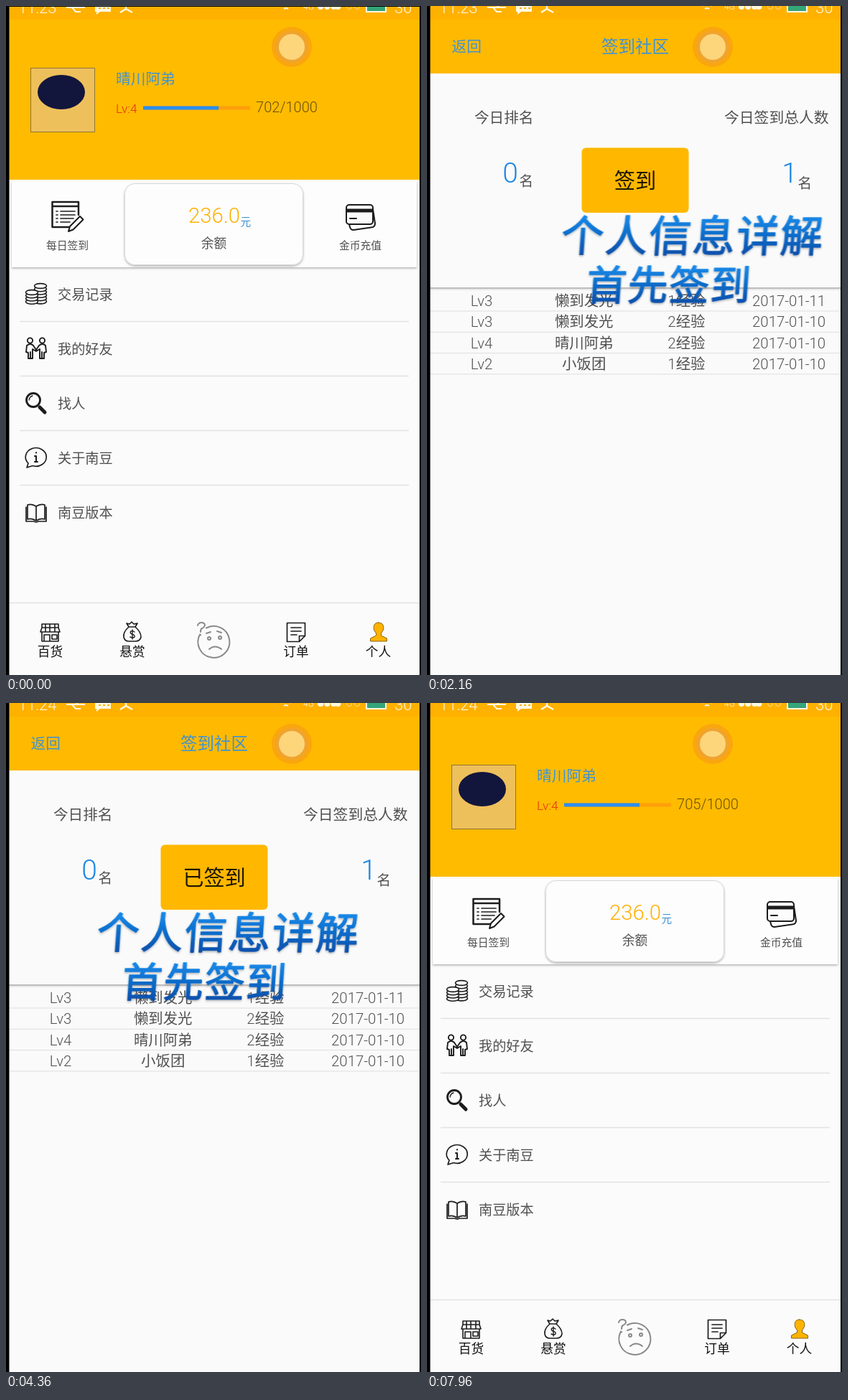
Recreate the animation shown at these times as an HTML page. Size 578 by 932 pixels, loop 8000 ms.

```html
<!DOCTYPE html>
<html lang="zh-CN">
<head>
<meta charset="utf-8">
<title>签到</title>
<style>
  html, body { margin: 0; width: 100%; height: 100%; overflow: hidden; background: #000; }
  svg { display: block; width: 578px; height: 932px; }
  text { font-family: Roboto, "Noto Sans CJK SC", "Noto Sans CJK", sans-serif; font-weight: 300; white-space: pre; }
  .brush text { font-weight: 400; stroke: url(#ink); stroke-width: 1.4; stroke-linejoin: round; }
  .nav text { font-weight: 400; }
  .icon { fill: none; stroke: #1c1c1c; stroke-width: 2; stroke-linecap: round; stroke-linejoin: round; }
  .icon.pale { stroke: #8a8a8a; }
  .icon .paper { fill: #fcfcfc; }
</style>
</head>
<body>
<svg viewBox="0 0 578 932">
  <defs>
    <linearGradient id="ink" x1="0" y1="0" x2="0" y2="1">
      <stop offset=".1" stop-color="#1488e8"/>
      <stop offset=".9" stop-color="#0b4da8"/>
    </linearGradient>
    <filter id="shade" x="-10%" y="-10%" width="120%" height="130%">
      <feDropShadow dx="0" dy="1.5" stdDeviation="1.5" flood-color="#000" flood-opacity=".3"/>
    </filter>
  </defs>

  <g id="home">
    <rect x="4" width="572" height="932" fill="#fbfbfb"/>
    <rect x="4" width="572" height="242" fill="#ffbb00"/>
    <rect x="34.5" y="86.5" width="89" height="89" fill="#eec05c" stroke="#8f7434"/>
    <ellipse cx="77" cy="120" rx="33" ry="24" fill="#12163c"/>
    <path d="M191 142h149" stroke="#ff9f0a" stroke-width="5"/>
    <path d="M191 142h105" stroke="#2b8eee" stroke-width="5"/>
    <rect x="8" y="244" width="564" height="120" fill="#fdfdfd" filter="url(#shade)"/>
    <rect x="165.500" y="247.500" width="248" height="113" rx="14" fill="#fdfdfd" stroke="#d8d8d8" filter="url(#shade)"/>
    <path d="M19 439.500h542m-542 76h542m-542 76h542m-542 76h542M4 831.500h572" stroke="#e2e2e2" stroke-width="1.500"/>

    <g class="icon">
      <!-- daily sign-in -->
      <path d="M101 291v-18H64.500v35H89M64.500 279H101" stroke-width="2.500"/>
      <path d="M70 286h2m4 0h20M70 291h2m4 0h20M70 296h2m4 0h18M70 301h2m4 0h13" stroke-width="1.700"/>
      <path class="paper" d="M87 314l2-7 14-14 4.500 4.500-14 14z"/>
      <!-- cards -->
      <path d="M511 283l3 20q0 4-3 5l-27 4q-4 0-5-4l-1-4"/>
      <rect class="paper" x="474" y="277" width="37" height="27" rx="4"/>
      <path d="M475 285h35" stroke-width="5" stroke-linecap="butt"/>
      <path d="M479 296h9"/>
      <!-- coins -->
      <g id="coins" stroke-width="1.600"></g>
      <!-- friends -->
      <g stroke-width="1.900">
        <circle cx="33.500" cy="466" r="3.600"/>
        <circle cx="50.500" cy="466" r="3.600"/>
        <path d="M29 473q5-4 9 0l4 6 4-6q5-4 9 0l1 9-3 1v8h-6v-13l-5 3-5-3v13h-6v-8l-3-1z"/>
        <path d="M34 482v8m16-8v8"/>
      </g>
      <!-- search -->
      <circle cx="38" cy="549" r="9.500" stroke-width="2.800"/>
      <path d="M47 559l7 7" stroke-width="5"/>
      <path d="M32 549q1-5 5-6" stroke-width="1.300"/>
      <!-- about -->
      <path d="M31 637l-2 6 8-2.500a14.500 12.800 0 1 0-6-3.500z" stroke-width="1.700"/>
      <path d="M40 627h2v8m-2 0h4M42 622v.500"/>
      <!-- book -->
      <path d="M42 697q-6-4-12-2v20q6-2 12 2 6-4 12-2v-20q-6-2-12 2v20M28 698v20h11q3 2 6 0h11v-20" stroke-width="1.700"/>
      <!-- store -->
      <path d="M50 861h23v5H50zM50 866l-2 6h27l-2-6M55 861v11m6-11v11m7-11v11M50 872v13h23v-13M53 885v-9h8v9m3-3v-6h7v6z" stroke-width="1.600"/>
      <!-- money bag -->
      <path d="M171 865q-8 7-7 14 1 6 7 6h9q7 0 8-6 0-7-8-14zM171 865l-3-5 4 1 3-3 3 3 5-1-3 5" stroke-width="1.600"/>
      <path d="M179 872q-3-2-5-1-2 2 1 4 5 1 4 4-2 2-6 0M176 869v13" stroke-width="1.400"/>
      <!-- order -->
      <path d="M391.500 859.500h25v18l-8 8h-17zM416.500 877.500h-8v8M397 866h14m-14 5h14m-14 5h8" stroke-width="1.700"/>
      <!-- person -->
      <path d="M518.500 859c-6 0-7 5-6 10l3 5v3l-8 4v4h23v-4l-8-4v-3l3-5c1-5 0-10-7-10z" fill="#ffb300" stroke="#8a6510" stroke-width="1"/>
    </g>
    <g class="icon pale">
      <path d="M279 866.500a22 22 0 1 1-9 9"/>
      <path d="M267 863q1-4 5-4 5 0 5 4-1 3-4 4-2 1-2 5m0 4v.500"/>
      <circle cx="283" cy="881" r="2"/>
      <circle cx="298" cy="880" r="2"/>
      <path d="M279 874l6-2m9-1l6 2M283 896q8-7 17 0"/>
    </g>
  </g>

  <g id="sign">
    <rect x="4" width="572" height="932" fill="#fafafa"/>
    <rect x="4" width="572" height="94" fill="#ffb900"/>
    <path d="M4 393h572" stroke="#bdbdbd" stroke-width="2"/>
    <path d="M4 395h572" stroke="#e9e9e9" stroke-width="2"/>
    <rect id="button" x="215.500" y="197.500" width="149" height="90.500" rx="6" fill="#ffb700"/>
  </g>

  <g id="bar">
    <rect x="4" width="572" height="19" fill="#ffb100"/>
    <g fill="none" stroke="#fff8e0" stroke-width="2">
      <path d="M84 2h26m-18 0l5 6h7M97 2l5-4"/>
      <path d="M167 0v4l-8 5m8-5l9 5" stroke-width="2.500"/>
      <path d="M383 0q7-5 14 0m-10 4q3-2 6 0"/>
      <path d="M124 0h22v8h-15l-5 4v-4h-2z" fill="#fff8e0" stroke="none"/>
      <path d="M129 3h3m3 0h3m3 0h3" stroke="#ffb100"/>
      <path d="M502 0v8h27V0" fill="#35a57a"/>
      <circle cx="478" cy="1" r="3.500" stroke-width="1" opacity=".6"/>
      <circle cx="489" cy="1" r="3.500" stroke-width="1" opacity=".6"/>
      <path d="M438 1h.1m9 0h.1m9 0h.1m6 0h.1" stroke-width="8" stroke-linecap="round"/>
    </g>
  </g>

  <g id="dot">
    <circle cx="398" cy="57" r="28" fill="#faa60f"/>
    <circle cx="398" cy="57" r="22.500" fill="#f0a42e"/>
    <circle cx="398" cy="57" r="18" fill="#fdd67c"/>
  </g>

  <g id="toast"><rect x="203" y="768" width="175" height="52" fill="#7f7f7f"/></g>
  <path d="M0 0h4.500v932H0zM576 0h2v932h-2z"/>
  <path id="edge" d="M0 0h578v1H0z"/>
  <g id="caption" class="brush"></g>
</svg>

<script>
const LOOP = 8000;
const SVG = 'http://www.w3.org/2000/svg';
const $ = id => document.getElementById(id);
const BLUE = '#3f93d2', GREY = '#505050', INK = '#1d1600';

function add(parent, tag, attrs = {}) {
  const el = document.createElementNS(SVG, tag);
  for (const k in attrs) el.setAttribute(k, attrs[k]);
  return parent.appendChild(el);
}

// Text whose glyphs are centred on cy.
function label(parent, str, x, cy, size, fill = GREY, anchor = 'start') {
  const el = add(parent, 'text', { x, y: cy + size * .37, 'font-size': size, fill, 'text-anchor': anchor });
  el.textContent = str;
  return el;
}
const centred = (parent, str, x, cy, size, fill) => label(parent, str, x, cy, size, fill, 'middle');

// steps: [time, value, easing to the next step]
function play(el, prop, steps) {
  const all = [[0, steps[0][1]], ...steps, [LOOP, steps[steps.length - 1][1]]];
  el.animate(all.map(([t, v, easing = 'linear']) => ({ offset: t / LOOP, [prop]: v, easing })),
    { duration: LOOP, iterations: Infinity });
}
const slide = (el, steps) => play(el, 'transform', steps.map(([t, x, e]) => [t, `translateX(${x}px)`, e]));
const swap = (before, after, t) => {
  play(before, 'opacity', [[t, 1], [t, 0]]);
  play(after, 'opacity', [[t, 0], [t, 1]]);
};

function buildHome() {
  const home = $('home');
  label(home, '晴川阿弟', 153, 101, 20.7, BLUE);
  label(home, 'Lv:4', 153, 142.5, 17.3, '#e62a14');
  const points = ['702/1000', '705/1000'].map(s => label(home, s, 348, 141, 20.1, '#6b4f0c'));
  swap(...points, 7400);

  label(home, '236.0', 254, 291, 29.3, '#ffb000');
  label(home, '元', 326.5, 301, 14.6, BLUE);
  centred(home, '余额', 289.5, 330, 17.7);
  centred(home, '每日签到', 85.5, 334, 14.8);
  centred(home, '金币充值', 493.5, 334, 14.8);
  ['交易记录', '我的好友', '找人', '关于南豆', '南豆版本']
    .forEach((s, i) => label(home, s, 72, 402 + 76 * i, 19.2));

  const nav = add(home, 'g', { class: 'nav' });
  [['百货', 61.5], ['悬赏', 176], ['订单', 404], ['个人', 518.5]]
    .forEach(([s, x]) => centred(nav, s, x, 899.5, 17.7, '#111'));

  const stack = (cx, top, count) => {
    for (let i = count; i >= 0; i--) {
      add($('coins'), 'ellipse', { class: 'paper', cx, cy: top + 4.3 * i, rx: 8.5, ry: 3.4 });
    }
  };
  stack(48, 390, 5);
  stack(36, 399, 3);
}

function table(parent, rows) {
  const g = add(parent, 'g');
  rows.forEach((row, i) => {
    const y = 410.5 + 29.3 * i;
    row.forEach((s, c) => centred(g, s, 76 + 142.7 * c, y, 20.4));
    add(g, 'path', { d: `M4 ${y + 14.5}h572`, stroke: '#dedede' });
  });
  return g;
}

function buildSign() {
  const sign = $('sign');
  label(sign, '返回', 34.5, 56.5, 20.7, BLUE);
  centred(sign, '签到社区', 290, 56.5, 23.5, BLUE);
  label(sign, '今日排名', 66, 155, 20.6);
  label(sign, '今日签到总人数', 414, 155, 20.8);
  label(sign, '名', 128.5, 243.5, 19.5);
  label(sign, '名', 516.5, 246.5, 19.5);

  swap(centred(sign, '签到', 290, 243, 29.2, INK), centred(sign, '已签到', 290, 243, 29.2, INK), 3800);
  play($('button'), 'fill', [[3360, '#ffb700'], [3400, '#f3a900'], [3520, '#f3a900'], [3600, '#ffb700']]);

  const count = (rank, total) => {
    const g = add(sign, 'g');
    centred(g, rank, 116, 232, 39, '#1d87e4');
    centred(g, total, 505, 232, 39, '#1d87e4');
    return g;
  };
  swap(count('0', '1'), count('2', '2'), 4400);

  const older = [
    ['Lv3', '懒到发光', '1经验', '2017-01-11'],
    ['Lv3', '懒到发光', '2经验', '2017-01-10'],
    ['Lv4', '晴川阿弟', '2经验', '2017-01-10'],
    ['Lv2', '小饭团', '1经验', '2017-01-10'],
  ];
  const latest = ['Lv4', '晴川阿弟', '3经验', '2017-01-11'];
  swap(table(sign, older), table(sign, [latest, ...older]), 4400);

  // Quick start, long settle, both ways.
  const glide = 'cubic-bezier(.13,.1,.1,1)';
  slide(sign, [[802, 572, glide], [1162, 0], [7025, 0, glide], [7385, 572]]);
}

function buildOverlay() {
  const bar = $('bar');
  const clock = ['11:23', '11:24'].map(s => label(bar, s, 17, 2, 22, '#fff8e0'));
  swap(...clock, 3800);
  label(bar, '4G', 414, 1, 12, '#fff8e0');
  label(bar, '30', 541, 2, 22, '#fff8e0');
  play($('edge'), 'opacity', [[680, 1], [680, 0]]);

  centred($('toast'), '签到成功', 290, 795, 20.7, '#fff');
  play($('toast'), 'opacity', [[4360, 0], [4760, 1], [6280, 1], [6680, 0]]);

  const caption = $('caption');
  const brush = (s, x, cy, size, gap) => {
    const g = add(caption, 'g', { transform: `translate(${x} ${cy}) skewX(-4)`, filter: 'url(#shade)' });
    label(g, s, 0, 0, size, 'url(#ink)').setAttribute('letter-spacing', gap);
  };
  brush('个人信息详解', 127, 320, 59, 2);
  brush('首先签到', 162, 388, 56, 1.5);
  slide(caption, [
    [1300, 455, 'cubic-bezier(.33,.6,.67,.81)'], [1800, 136, 'cubic-bezier(.33,.48,.67,.77)'],
    [2120, 64], [2520, 29], [2720, 0],
  ]);
  play(caption, 'opacity', [[4900, 1], [6080, 0]]);
}

buildHome();
buildSign();
buildOverlay();
</script>
</body>
</html>
```
